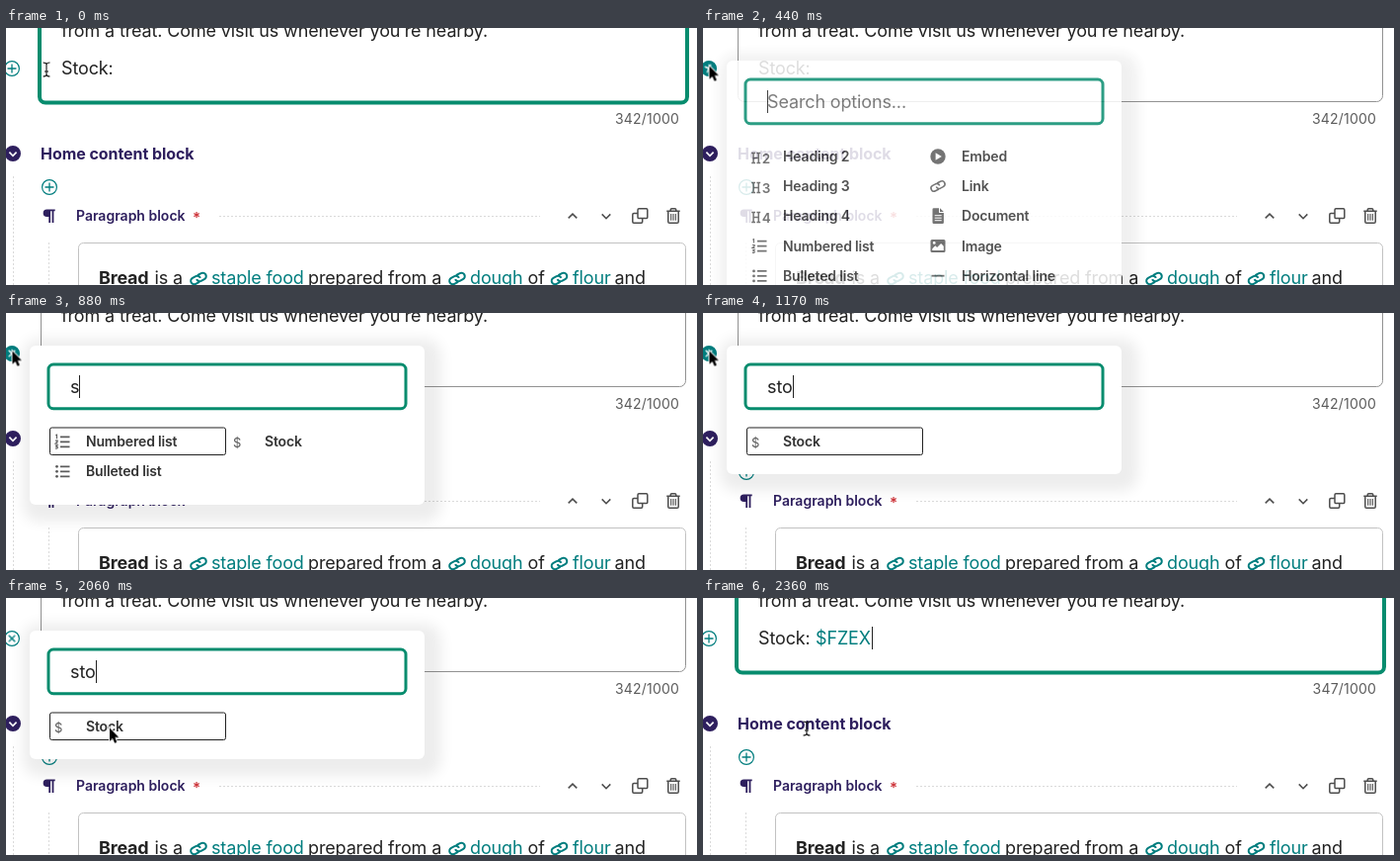
Recreate the animation shown at these times as an HTML page. Size 700 px wide and 260 px high, loop 2510 ms.

```html
<!DOCTYPE html>
<html lang="en">
<head>
<meta charset="utf-8">
<title>Inserting a stock ticker</title>
<style>
html, body { margin: 0; width: 100%; height: 100%; overflow: hidden; background: #fff; }
#stage { position: relative; width: 700px; height: 260px; overflow: hidden; }
svg { position: absolute; left: 0; top: 0; width: 700px; height: 260px; }
text { font-family: Inter, "Open Sans", sans-serif; white-space: pre; }

.body { font-size: 18px; letter-spacing: -.14px; fill: #222; }
.bold { font-weight: 700; letter-spacing: -.2px; }
.teal { fill: #007d7e; }
.title { font-size: 16px; font-weight: 700; letter-spacing: -.06px; fill: #2e1f5e; }
.block { font-size: 14px; font-weight: 600; letter-spacing: 0; fill: #2e1f5e; }
.count { font-size: 14px; letter-spacing: .2px; fill: #5c5c5c; text-anchor: end; }
.label { font-size: 14px; font-weight: 600; letter-spacing: -.17px; fill: #333; }
.hint { fill: #666; }
.line { fill: none; stroke: #929292; }
.focus { fill: none; stroke: #078c6e; stroke-width: 4; }
.find { stroke-width: 3; }
.dash { stroke: #dadada; stroke-dasharray: 2 2; }
.tool { fill: none; stroke: #4c4c4c; stroke-width: 1.5; }
.ring { fill: #fff; stroke: #007d7e; stroke-width: 1.2; }
.plus { fill: none; stroke: #007d7e; stroke-width: 1.3; }
.icon { fill: #5c5c5c; color: #5c5c5c; }
.pick { fill: none; stroke: #222; }
.caret { fill: #222; }

/* every part holds its pose until the next key */
.a { animation: 2510ms step-end infinite; }

.panel { position: absolute; left: 24px; top: 33px; width: 400px; height: 130px;
  background: #fff; border-radius: 6px; box-shadow: 5px 5px 14px 12px rgba(0,0,0,.075);
  animation-name: grow; }
#menu { position: absolute; inset: 0; animation-name: menu; }

.idle { animation-name: idle; }
.busy { animation-name: busy; }
.done { animation-name: done; }
.before { animation-name: before; }
.all { animation-name: all; }
.two { animation-name: two; }
.one { animation-name: one; }
.s { animation-name: s; }
.t { animation-name: t; }
.o { animation-name: o; }
.edit-caret { animation-name: edit-caret; }
.find-caret { animation-name: find-caret; }
.add-ring { animation-name: add-ring; }
.add-plus { animation-name: add-plus; }
.arrow { animation-name: arrow; }
.beam { animation-name: beam; }

@keyframes idle { 0% { opacity: 1 } 17.529% { opacity: 0 } 88.047%, 100% { opacity: 1 } }
@keyframes busy { 0% { opacity: 0 } 17.529% { opacity: 1 } 88.047%, 100% { opacity: 0 } }
@keyframes before { 0% { opacity: 1 } 88.047%, 100% { opacity: 0 } }
@keyframes done { 0% { opacity: 0 } 88.047%, 100% { opacity: 1 } }
@keyframes menu { 0% { opacity: 0 } 17.529% { opacity: .85 } 23.107% { opacity: 1 } 88.047%, 100% { opacity: 0 } }
@keyframes grow { 0% { height: 300px } 35.059% { height: 161px } 46.613%, 100% { height: 130px } }
@keyframes all { 0% { opacity: 1 } 35.059%, 100% { opacity: 0 } }
@keyframes two { 0% { opacity: 0 } 35.059% { opacity: 1 } 46.613%, 100% { opacity: 0 } }
@keyframes one { 0% { opacity: 0 } 46.613%, 100% { opacity: 1 } }
@keyframes s { 0% { fill: transparent } 35.059%, 100% { fill: #222 } }
@keyframes t { 0% { fill: transparent } 40.636%, 100% { fill: #222 } }
@keyframes o { 0% { fill: transparent } 46.613%, 100% { fill: #222 } }
@keyframes edit-caret {
  0% { opacity: 0; transform: translate(114px, 29px) }
  5.577% { opacity: 1; transform: translate(114px, 29px) }
  17.529% { opacity: 0; transform: translate(171px, 29px) }
  88.047%, 100% { opacity: 1; transform: translate(171px, 29px) }
}
@keyframes find-caret {
  0% { opacity: 1; transform: translate(65px, 63px) }
  35.059% { opacity: 1; transform: translate(74px, 63px) }
  40.636% { opacity: 1; transform: translate(80px, 63px) }
  46.613% { opacity: 1; transform: translate(91px, 63px) }
  64.143% { opacity: 0; transform: translate(91px, 63px) }
  82.071%, 100% { opacity: 1; transform: translate(91px, 63px) }
}
@keyframes add-ring { 0% { fill: #fff } 5.577% { fill: #007d7e } 64.143%, 100% { fill: #fff } }
@keyframes add-plus {
  0% { stroke: #007d7e; transform: rotate(0) }
  5.577% { stroke: #fff; transform: rotate(0) }
  17.529% { stroke: #fff; transform: rotate(25deg) }
  23.107% { stroke: #fff; transform: rotate(41deg) }
  29.083% { stroke: #fff; transform: rotate(45deg) }
  64.143% { stroke: #007d7e; transform: rotate(45deg) }
  88.047% { stroke: #007d7e; transform: rotate(20deg) }
  94.023%, 100% { stroke: #007d7e; transform: rotate(0) }
}
@keyframes arrow {
  0% { opacity: 0; transform: translate(15.5px, 40px) }
  5.577% { opacity: 1; transform: translate(15.5px, 40px) }
  11.553% { opacity: 1; transform: translate(6.5px, 38.5px) }
  58.167% { opacity: 1; transform: translate(18.5px, 55.5px) }
  64.143% { opacity: 1; transform: translate(91px, 114.5px) }
  70.119% { opacity: 1; transform: translate(100.5px, 125.5px) }
  76.095% { opacity: 1; transform: translate(105px, 131.5px) }
  88.047%, 100% { opacity: 0; transform: translate(105px, 131.5px) }
}
@keyframes beam {
  0% { opacity: 1; transform: translate(41px, 42px) }
  5.577% { opacity: 0; transform: translate(41px, 42px) }
  88.047%, 100% { opacity: 1; transform: translate(105px, 132px) }
}
</style>
</head>
<body>
<div id="stage">

<svg viewBox="0 0 700 260">
  <defs>
    <path id="loop" d="M-.6 3.2H-4.6a3.2 3.2 0 0 1 0-6.4H-1.2a3.2 3.2 0 0 1 3 3.6" fill="none" stroke="currentColor"/>
    <g id="link" transform="rotate(-28) scale(1.07)">
      <use href="#loop"/><use href="#loop" transform="rotate(180)"/>
    </g>
    <path id="cross" d="M-4.5 0h9M0-4.5v9"/>
    <path id="h" d="M-7.8-4.5h3.8M-2.6-4.5h3.8M-7.8 5.5h3.8M-2.6 5.5h3.8M-5.9-4.5v10M-.7-4.5v10M-5.9.4h5.2" fill="none" stroke="currentColor" stroke-width="1.5"/>
    <path id="rows" d="M-2-4.7h9.5M-2 .3h9.5M-2 5.3h9.5" stroke="currentColor" stroke-width="1.7"/>
    <g id="ol">
      <use href="#rows"/>
      <path d="M-6.7-6.2l1.2-.6v4M-7-.9h2.2v1L-7 2h2.5M-7 3.9h2.2L-6 5.2q1.5 0 1.3 1.1T-7 7" fill="none" stroke="currentColor" stroke-width="1.1"/>
    </g>
    <g id="ul">
      <use href="#rows"/>
      <circle cx="-5.5" cy="-4.7" r="1.4"/><circle cx="-5.5" cy=".3" r="1.4"/><circle cx="-5.5" cy="5.3" r="1.4"/>
    </g>
  </defs>

  <text class="body" x="56" y="9">from a treat. Come visit us whenever you’re nearby.</text>
  <text class="body" x="56" y="47">Stock:</text>
  <text class="body teal a done" x="114" y="47">$FZEX</text>
  <rect class="focus a idle" x="34" y="-20" width="656" height="95.5" rx="6"/>
  <rect class="line a busy" x="35.5" y="-20" width="653" height="94.5" rx="6"/>
  <rect class="caret a edit-caret" width="1" height="23"/>
  <text class="count a before" x="682" y="97">342/1000</text>
  <text class="count a done" x="682" y="97">347/1000</text>

  <g transform="translate(6 41)">
    <circle class="ring a add-ring" r="7.4"/>
    <use href="#cross" class="plus a add-plus"/>
  </g>

  <path class="dash" d="M7.5 150V260M43.5 217V260M216 190.5H541"/>
  <circle cx="7" cy="127" r="8" fill="#2e1f5e"/>
  <path d="M3.4 125.7l3.6 3.6 3.6-3.6" fill="none" stroke="#fff" stroke-width="1.7"/>
  <text class="title" x="35" y="133">Home content block</text>
  <g transform="translate(44 161)">
    <circle class="ring" r="7.4"/><use href="#cross" class="plus"/>
  </g>
  <path d="M41.4 183.5h8.3v1.8h-1.3V197h-1.8v-11.7h-1.5V197h-1.8v-6h-1.9a3.75 3.75 0 0 1 0-7.5z" fill="#2e1f5e"/>
  <text class="block" x="71" y="195">Paragraph block</text>
  <text x="189" y="197" font-size="15" font-weight="600" fill="#cd3238">*</text>

  <g class="tool">
    <path d="M569.7 192.4l4.3-4.3 4.3 4.3M603.7 188.4l4.3 4.3 4.3-4.3"/>
    <rect x="640" y="182.8" width="9.8" height="9.8" rx="1.2"/>
    <path d="M640 187.5h-4q-1.2 0-1.2 1.2v7.3q0 1.2 1.2 1.2h7.5q1.2 0 1.2-1.2v-3.4"/>
    <path d="M669.3 185.3h13.4M673.2 185v-1q0-1.3 1.3-1.3h3q1.3 0 1.3 1.3v1M670.8 185.5v10.5q0 1.3 1.3 1.3h7.8q1.3 0 1.3-1.3v-10.5"/>
    <path d="M673.7 188v6.7M676 188v6.7M678.3 188v6.7" stroke-width="1.1"/>
  </g>

  <rect class="line" x="73.5" y="217.5" width="615" height="80" rx="5" style="stroke:#c2c2c2"/>
  <g class="body">
    <text class="bold" x="94" y="259">Bread</text>
    <text x="150.5" y="259">is a</text>
    <text x="306" y="259">prepared from a</text>
    <text x="528.5" y="259">of</text>
    <text x="616.5" y="259">and</text>
  </g>
  <g class="body teal" color="#007d7e" stroke-width="1.9">
    <use href="#link" transform="translate(195 253.5)"/>
    <text x="208" y="259">staple food</text>
    <use href="#link" transform="translate(457 253.5)"/>
    <text x="470" y="259">dough</text>
    <use href="#link" transform="translate(560.5 253.5)"/>
    <text x="574" y="259">flour</text>
  </g>
</svg>

<div id="menu" class="a">
  <div class="panel a"></div>
  <svg viewBox="0 0 700 260">
    <rect class="focus find" x="43" y="52" width="362" height="44.7" rx="5"/>
    <text class="body hint a all" x="65" y="81">Search options...</text>
    <text class="body" x="65" y="81"><tspan class="a s">s</tspan><tspan class="a t">t</tspan><tspan class="a o">o</tspan></text>
    <rect class="caret a find-caret" width="1" height="23"/>

    <g class="a all">
      <g class="icon">
        <g font-size="13.5" font-weight="600">
          <use href="#h" x="57" y="131"/><text x="59.8" y="136.8">2</text>
          <use href="#h" x="57" y="161"/><text x="59.8" y="166.8">3</text>
          <use href="#h" x="57" y="191"/><text x="59.8" y="196.8">4</text>
        </g>
        <use href="#ol" x="57" y="220.4"/>
        <use href="#ul" x="57" y="250.6"/>
        <circle cx="238" cy="130" r="7.7"/>
        <path d="M235.6 126.2v7.6l6.2-3.8z" fill="#fff"/>
        <use href="#link" transform="translate(238 160) scale(.9)" stroke-width="1.6"/>
        <path d="M232.5 183.6q0-1.3 1.3-1.3h5.2v4.6h4.9v9.8q0 1.3-1.3 1.3h-8.8q-1.3 0-1.3-1.3zM240 182.3l3.9 3.7H240z"/>
        <path d="M234.7 189.7h7M234.7 192.2h7M234.7 194.7h7" stroke="#fff"/>
        <rect x="230.5" y="214" width="15" height="13" rx="1.5"/>
        <path d="M232.3 225v-1.8l3-3 1.8 1.8 4-4 2.7 2.7v4.3z" fill="#fff"/>
        <circle cx="234.2" cy="217.4" r="1.4" fill="#fff"/>
        <path d="M231.5 249.8h13v1.8h-13z"/>
      </g>
      <g class="label">
        <text x="81" y="135">Heading 2</text><text x="262" y="135">Embed</text>
        <text x="81" y="165.2">Heading 3</text><text x="262" y="165.2">Link</text>
        <text x="81" y="195.4">Heading 4</text><text x="262" y="195.4">Document</text>
        <text x="81" y="225.6">Numbered list</text><text x="262" y="225.6">Image</text>
        <text x="81" y="255.8">Bulleted list</text><text x="262" y="255.8">Horizontal line</text>
      </g>
    </g>

    <g class="a two">
      <g class="icon">
        <use href="#ol" x="57" y="130"/>
        <use href="#ul" x="57" y="160"/>
        <text x="230" y="135.5" font-size="13">$</text>
      </g>
      <g class="label">
        <text x="81" y="134.7">Numbered list</text>
        <text x="81" y="165.2">Bulleted list</text>
        <text x="262" y="134.7">Stock</text>
      </g>
    </g>

    <g class="a one">
      <text class="icon" x="49" y="135.5" font-size="13">$</text>
      <text class="label" x="81" y="134.7">Stock</text>
    </g>
    <rect class="pick a busy" x="44.5" y="116" width="178" height="27.5" rx="2" style="animation-name:pick"/>
  </svg>
</div>

<svg viewBox="0 0 700 260">
  <g class="a arrow">
    <path d="M0 0V13.2L3 10.4 5.1 15.3 7.4 14.3 5.3 9.5H9.4Z" stroke="#fff" stroke-width="1.8" paint-order="stroke"/>
  </g>
  <path class="a beam" d="M-3.5-7Q0-7 0-5Q0-7 3.5-7M0-5V5M-2 2H2M-3.5 7Q0 7 0 5Q0 7 3.5 7" fill="none" stroke="#111" stroke-width="1.1"/>
</svg>

</div>
<style>
@keyframes pick { 0% { opacity: 0 } 35.059%, 100% { opacity: 1 } }
</style>
</body>
</html>
```
